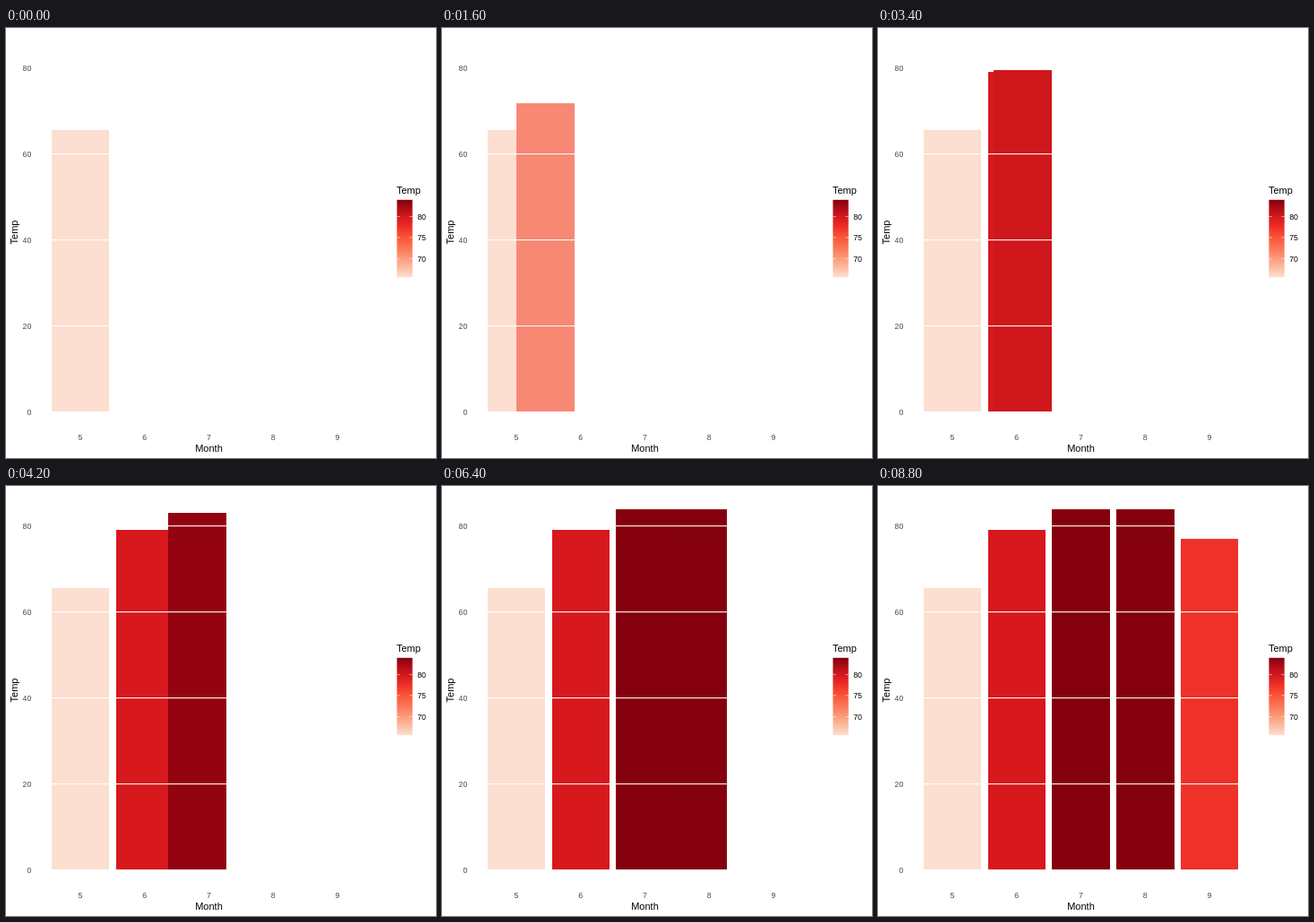
These frames come from a looping animation (480x480 px, 10000 ms). An HTML page:

```html
<!DOCTYPE html>
<html lang="en">
<head>
<meta charset="utf-8">
<title>Temp by Month</title>
<style>
  html, body { margin: 0; height: 100%; overflow: hidden; background: #fff; }
  svg { display: block; width: 480px; height: 480px; font: 11px "Liberation Sans", Arial, sans-serif; }
  .tick { font-size: 8.8px; fill: #4d4d4d; }
  .key { font-size: 8.8px; }
  .mid { text-anchor: middle; }
  .end { text-anchor: end; }
</style>
</head>
<body>
<svg id="chart" viewBox="0 0 480 480">
  <defs>
    <linearGradient id="reds" x1="0" y1="1" x2="0" y2="0"></linearGradient>
  </defs>
  <g id="bars"></g>
  <g id="grid" fill="#fff"></g>
  <text class="mid" x="226.5" y="473">Month</text>
  <text class="mid" transform="translate(13.2 228) rotate(-90)">Temp</text>
  <text x="436" y="185">Temp</text>
  <rect x="436.4" y="191.8" width="17.3" height="86.4" fill="url(#reds)"/>
  <g id="labels"></g>
</svg>
<script>
const temps = [65.55, 79.1, 83.9, 83.97, 76.9];
const colors = [[252, 223, 208], [215, 25, 30], [133, 0, 13], [132, 0, 13], [238, 50, 41]];
const palette = ['#fcdfd0', '#fbb092', '#fb8262', '#fb583b', '#ed2b24', '#c3121b', '#84000d'];
const LEFT = 50.76, STEP = 71.75, WIDTH = STEP * 0.9, BASE = 428.6, UNIT = 4.8;
const START = 1200, PERIOD = 2200, LOOP = 10000, FRAMES = 11;

function add(parent, tag, attrs, text = '') {
  const node = document.createElementNS('http://www.w3.org/2000/svg', tag);
  for (const key in attrs) node.setAttribute(key, attrs[key]);
  node.textContent = text;
  return document.getElementById(parent).appendChild(node);
}

// CIE Lab blending, with a display gamma applied around it.
const GAMMA = 1.22;
const toLinear = c => c > 0.04045 ? ((c + 0.055) / 1.055) ** 2.4 : c / 12.92;
const toDisplay = c => c > 0.0031308 ? 1.055 * c ** (1 / 2.4) - 0.055 : 12.92 * c;
const labCurve = v => v > 0.008856 ? Math.cbrt(v) : 7.787 * v + 16 / 116;
const labInverse = v => v > 0.2069 ? v ** 3 : (v - 16 / 116) / 7.787;

function toLab(rgb) {
  const [r, g, b] = rgb.map(c => toLinear((c / 255) ** (1 / GAMMA)));
  const x = labCurve((0.4124 * r + 0.3576 * g + 0.1805 * b) / 0.9505);
  const y = labCurve(0.2126 * r + 0.7152 * g + 0.0722 * b);
  const z = labCurve((0.0193 * r + 0.1192 * g + 0.9505 * b) / 1.089);
  return [y, x - y, y - z];
}

function toRgb([l, a, b]) {
  const x = labInverse(l + a) * 0.9505, y = labInverse(l), z = labInverse(l - b) * 1.089;
  const linear = [
    3.2406 * x - 1.5372 * y - 0.4986 * z,
    -0.9689 * x + 1.8758 * y + 0.0415 * z,
    0.0557 * x - 0.204 * y + 1.057 * z
  ];
  const channels = linear.map(c =>
    Math.round(255 * toDisplay(Math.min(1, Math.max(0, c))) ** GAMMA));
  return `rgb(${channels})`;
}

const mix = (a, b, p) => a + (b - a) * p;
const labs = colors.map(toLab);

function placeBar(bar, index, progress) {
  const next = Math.min(index + 1, temps.length - 1);
  const x = LEFT + STEP * (index + progress);
  const left = Math.round(x);
  const top = Math.round(BASE - UNIT * mix(temps[index], temps[next], progress));
  bar.setAttribute('x', left);
  bar.setAttribute('y', top);
  bar.setAttribute('width', Math.round(x + WIDTH) - left);
  bar.setAttribute('height', Math.round(BASE) - top);
  bar.setAttribute('fill', progress
    ? toRgb(labs[index].map((v, i) => mix(v, labs[next][i], progress)))
    : `rgb(${colors[index]})`);
}

const bars = temps.map((_, i) => {
  const bar = add('bars', 'rect', {});
  placeBar(bar, i, 0);
  add('labels', 'text', { class: 'tick mid', x: LEFT + WIDTH / 2 + STEP * i, y: 460 }, i + 5);
  return bar;
});
const mover = add('bars', 'rect', {});

for (let value = 0; value <= 80; value += 20) {
  const y = BASE - UNIT * value;
  add('grid', 'rect', { x: 35, y: y - 0.53, width: 383, height: 1.07 });
  add('labels', 'text', { class: 'tick end', x: 28.3, y: y + 3.1 }, value);
}

palette.forEach((color, i) =>
  add('reds', 'stop', { offset: i / (palette.length - 1), 'stop-color': color }));
for (const value of [70, 75, 80]) {
  const y = 278.2 - 86.4 * (value - 65.55) / (83.97 - 65.55);
  for (const x of [436.4, 450.2])
    add('labels', 'rect', { x, y: y - 0.25, width: 3.5, height: 0.5, fill: '#fff' });
  add('labels', 'text', { class: 'key', x: 459.2, y: y + 3.3 }, value);
}

function draw(time) {
  const t = time % LOOP - START;
  const index = t < 0 ? 0 : Math.floor(t / PERIOD);
  const frame = t < 0 ? 0 : Math.min(FRAMES, Math.floor(t % PERIOD / 100) + 1);
  const arrived = index + (frame === FRAMES ? 1 : 0);
  bars.forEach((bar, i) => bar.setAttribute('visibility', i <= arrived ? 'visible' : 'hidden'));
  const moving = frame > 0 && frame < FRAMES;
  mover.setAttribute('visibility', moving ? 'visible' : 'hidden');
  if (moving) placeBar(mover, index, frame / FRAMES);
}

const origin = performance.now();
function tick() {
  draw(performance.now() - origin);
  requestAnimationFrame(tick);
}
tick();
</script>
</body>
</html>
```
